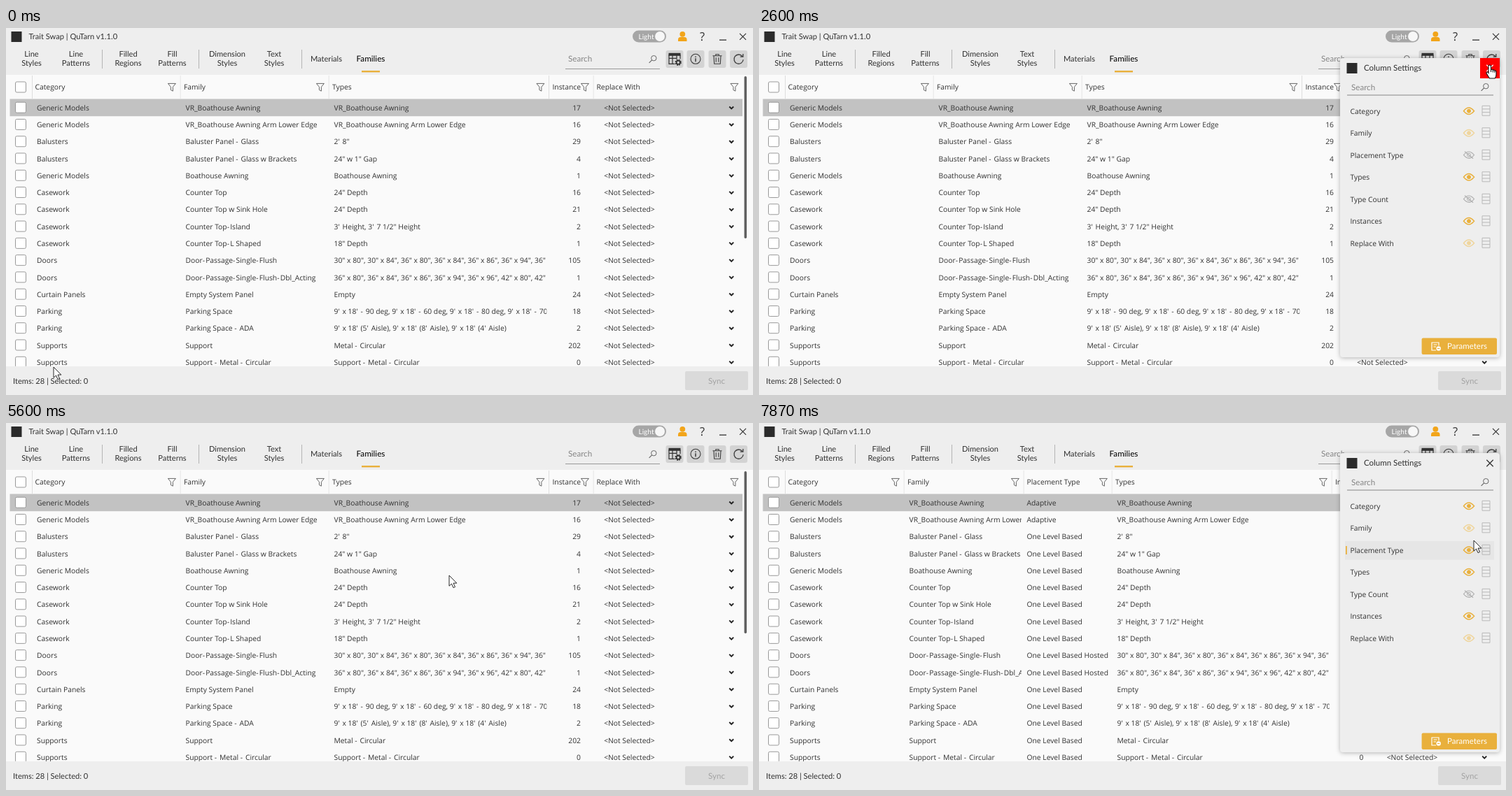
Write an HTML page that moves like this. It is 1067x525 px and loops after 8 s.

```html
<!DOCTYPE html>
<html lang="en">
<head>
<meta charset="utf-8">
<title>Column settings</title>
<style>
  html, body { margin: 0; width: 100%; height: 100%; overflow: hidden; background: #eee; }
  svg { display: block; }
  text { font: 10.3px "Open Sans", "Noto Sans", sans-serif; fill: #303030; text-rendering: geometricPrecision; white-space: pre; }
  .ui { font-family: Lato, "Open Sans", sans-serif; font-size: 11.1px; }
  .mark { letter-spacing: 1.2px; }
  .mid { text-anchor: middle; }
  .end { text-anchor: end; }
  .dim { fill: #9a9a9a; }
  .line { fill: none; stroke: #3c3c3c; stroke-width: 1.1; }
  .shadow { filter: drop-shadow(0 1px 3px rgba(0, 0, 0, .28)); }
</style>
</head>
<body>
<svg id="stage" width="1067" height="525" viewBox="0 0 1067 525"></svg>
<script>
const ORANGE = '#e9b03c';
const $ = id => document.getElementById(id);

// Drawing helpers
const rect = (x, y, w, h, fill, extra = '') =>
  `<rect x="${x}" y="${y}" width="${w}" height="${h}" fill="${fill}" ${extra}/>`;
const text = (x, y, s, cls = '', extra = '') =>
  `<text x="${x}" y="${y}" class="${cls}" ${extra}>${s.replace(/</g, '&lt;').replace(/['-]/g, '<tspan class="mark">$&</tspan>')}</text>`;
const path = (d, extra = '') => `<path class="line" d="${d}" ${extra}/>`;
const at = (x, y, body) => `<g transform="translate(${x} ${y})">${body}</g>`;
const group = (id, body) => `<g id="${id}">${body}</g>`;
const paint = (stroke, width = 1.1) => `style="stroke:${stroke};stroke-width:${width}"`;

// Icons, centred on 0,0
const FUNNEL = 'M-5.5-5.3H5.5L1.5-.4V5.5L-1.5 4V-.4Z';
const cross = (r, color, w = 1.1) => path(`M${-r} ${-r}L${r} ${r}M${r} ${-r}L${-r} ${r}`, paint(color, w));
const lens = color => `<circle cx="1.3" cy="-1.3" r="3.7" fill="none" stroke="${color}"/>` + path('M-1.4 1.4L-5.4 5.4', paint(color));
const tableGear = bg => rect(-8.5, -8.5, 17, 4, '#333') +
  path('M-8-6V7H1M-3-6V7M3-6V1M8-6V0M-8-1H3', paint('#333', 1.2)) +
  `<circle cx="5.2" cy="5" r="5.4" fill="${bg}"/>` +
  '<circle cx="5.2" cy="5" r="3.5" fill="none" stroke="#333" stroke-width="2.2" stroke-dasharray="1.8 .95"/>' +
  '<circle cx="5.2" cy="5" r="2.5" fill="none" stroke="#333" stroke-width="1.6"/>';
const info = '<circle r="7" class="line"/>' + path('M0-1V4M0-3.8V-2.3', paint('#333', 1.4));
const trash = path('M-6.5-4.5H6.5M-2.2-4.5V-6.5H2.2V-4.5M-5-4.5L-4.3 7H4.3L5-4.5M-1.8-2V4.5M1.8-2V4.5');
const refresh = path('M5.2-3.8A6.6 6.6 0 1 0 6.6 1M6.3-7.3V-3.2H2.2', paint('#3c3c3c', 1.3));
const eye = (color, off) => path('M-7.5 0Q0-9.4 7.5 0Q0 9.4-7.5 0Z', paint(color, off ? 1.1 : 1.5)) +
  `<circle r="2.5" fill="${off ? 'none' : color}" stroke="${color}"/>` + (off ? path('M-6-5L6 5', paint(color, 1.3)) : '');
const listIcon = path('M-5.5-7H5.5V7H-5.5ZM-5.5-2.4H5.5M-5.5 2.3H5.5', paint('#b9b9b9', 1));
const groupIcon = color => path('M-1-5.5H7V5.5H-1ZM-1-1.8H7M-1 1.8H7M3-5.5V5.5M-7-2.5H-3V2.5H-7ZM-3 0H-1', paint(color, 1));
const box = y => rect(13.5, y - 7.5, 15, 15, '#fff', 'rx="2" stroke="#999"');

// Table
const ROWS = `Generic Models|VR_Boathouse Awning|Adaptive|VR_Boathouse Awning|17
Generic Models|VR_Boathouse Awning Arm Lower Edge|Adaptive|VR_Boathouse Awning Arm Lower Edge|16
Balusters|Baluster Panel - Glass||2' 8"|29
Balusters|Baluster Panel - Glass w Brackets||24" w 1" Gap|4
Generic Models|Boathouse Awning||Boathouse Awning|1
Casework|Counter Top||24" Depth|16
Casework|Counter Top w Sink Hole||24" Depth|21
Casework|Counter Top-Island||3' Height, 3' 7 1/2" Height|2
Casework|Counter Top-L Shaped||18" Depth|1
Doors|Door-Passage-Single-Flush|One Level Based Hosted|30" x 80", 30" x 84", 36" x 80", 36" x 84", 36" x 86", 36" x 94", 36"|105
Doors|Door-Passage-Single-Flush-Dbl_Acting|One Level Based Hosted|36" x 80", 36" x 84", 36" x 86", 36" x 94", 36" x 96", 42" x 80", 42"|1
Curtain Panels|Empty System Panel||Empty|24
Parking|Parking Space||9' x 18' - 90 deg, 9' x 18' - 60 deg, 9' x 18' - 80 deg, 9' x 18' - 70|18
Parking|Parking Space - ADA||9' x 18' (5' Aisle), 9' x 18' (8' Aisle), 9' x 18' (4' Aisle)|2
Supports|Support||Metal - Circular|202
Supports|Support - Metal - Circular||Support - Metal - Circular|0`
  .split('\n').map(r => [...r.split('|'), '<Not Selected>']);
const rowY = i => 114 + 24.27 * i;

// name, header offset, cell offset
const COLS = [['Category', 4.5, 7], ['Family', 5.5, 8], ['Placement Type', 5, 5],
  ['Types', 5.5, 8], ['Instance', 5.5, 46], ['Replace With', 5, 15.7]];
const NARROW = [37, 248.5, 460.5, 460.5, 775, 838.5, 1052];
const WIDE = [37, 206.5, 377.5, 503.5, 817.5, 881, 1052];

function table(edges) {
  return COLS.map(([name, hx, cx], c) => {
    const x = edges[c], w = edges[c + 1] - x;
    if (!w) return '';
    const cells = ROWS.map((r, i) =>
      text(cx, rowY(i) + 3.8, r[c] || 'One Level Based', c === 4 ? 'end' : '') +
      (c === 5 ? at(w - 15.8, rowY(i), path('M-3-1.5L0 1.5L3-1.5', paint('#222', 1.9))) : '')).join('');
    return `<svg x="${x}" y="0" width="${w - 2.8}" height="525">` + rect(0, 68, 1, 33, '#dedede') +
      text(hx, 88.3, name) + cells + at(w - 11.6, 84.7, path(FUNNEL, paint('#666', 1))) + '</svg>';
  }).join('');
}

// Window frame
const TABS = [[36.5, 'Line', 'Styles'], [100, 'Line', 'Patterns'], [174.5, 'Filled', 'Regions'], [237.5, 'Fill', 'Patterns'],
  [316, 'Dimension', 'Styles'], [383, 'Text', 'Styles'], [457.5, 'Materials'], [521, 'Families']];
const tabs = TABS.map(([x, a, b]) => b
  ? text(x, 41.4, a, 'ui mid') + text(x, 53.6, b, 'ui mid')
  : text(x, 48, a, 'ui mid', a === 'Families' ? 'style="fill:#000;font-size:11.7px"' : '')).join('') +
  [137, 275, 422].map(x => rect(x, 31, 1, 27, '#b5b5b5')).join('') + rect(508, 61, 26, 2.4, ORANGE);

const tool = (x, icon, id) => rect(x - 12.5, 32, 25, 25, '#d3d3d3', `rx="3" id="${id}"`) + at(x, 44.3, icon);
const header = rect(7.5, 5, 15, 15, '#2b2b2b') + text(32.5, 16, 'Trait Swap | QuTarn v1.1.0', 'ui') +
  rect(895, 3.5, 48, 17, '#a6a6a6', 'rx="8.5"') + text(903.5, 16, 'Light', 'ui', 'style="fill:#fff;font-size:10.1px"') +
  '<circle cx="934" cy="12" r="7" fill="#f7f7f7"/>' +
  '<circle cx="966.3" cy="8.8" r="3.9" fill="#f2a51a"/><path d="M960 19V16.5Q960 13.4 963.5 13H969Q972.5 13.4 972.5 16.5V19Z" fill="#f2a51a"/>' +
  text(994.5, 18, '?', 'mid', 'style="font-size:16.5px"') + rect(1019, 16.5, 10, 1.3, '#333') +
  at(1052.5, 12.3, cross(4.5, '#333', 1.2)) + tabs +
  text(803, 48, 'Search', 'ui dim', 'style="font-size:11.6px;fill:#858585"') + rect(799, 58, 135, 1, '#999') + at(924, 44.5, lens('#666')) +
  tool(955, tableGear('#d3d3d3'), 'colBtn') + tool(985, info, 'infoBtn') + tool(1016, trash, 'trashBtn') + tool(1046.5, refresh, 'refreshBtn');

const footer = rect(0, 484, 1067, 41, '#eee') + text(10, 508.5, 'Items: 28 | Selected: 0', 'ui') +
  rect(970, 491, 90, 27, '#dadada', 'rx="2"') + text(1015, 508.6, 'Sync', 'ui mid', 'style="font-size:11.6px;fill:#a3a3a3"');

// Column settings panel
const FIELDS = [['Category', 1], ['Family', 2], ['Placement Type', 0], ['Types', 1], ['Type Count', 0], ['Instances', 1], ['Replace With', 2]];
const eyeKinds = [eye('#b0b0b0', true), eye(ORANGE), eye('#efd59c')];
const fields = FIELDS.map(([name, kind], i) => {
  const y = 118.7 + 31.5 * i;
  const icon = i === 2 ? group('eyeOff', eyeKinds[0]) + group('eyeOn', eyeKinds[1]) : eyeKinds[kind];
  return text(844.5, y + 3.9, name) + at(1014, y, icon) + at(1038.5, y - .4, listIcon);
}).join('');
const panel = rect(830, 43, 228, 428, '#eee', 'rx="4" class="shadow"') +
  rect(839.5, 50, 15, 15, '#2b2b2b') + text(864, 61.3, 'Column Settings', 'ui', 'style="font-size:11.5px"') +
  rect(1030, 43, 28, 29, '#f00', 'id="closeBg"') + `<g id="closeX" transform="translate(1044 57.5)">${cross(4.7, 'currentColor', 1.3)}</g>` +
  text(846, 88.5, 'Search', 'ui', 'style="font-size:11.6px;fill:#858585"') + rect(840, 95.5, 209, 1, '#888') + at(1037, 84.5, lens('#666')) +
  group('picked', rect(837, 169, 213, 26.5, '#e6e6e6') + rect(838, 176, 1.8, 12, ORANGE)) + fields +
  rect(946.6, 443.6, 107.4, 23.4, ORANGE, 'rx="2"') +
  at(967, 455.5, path('M4-1V-5.5H-6V5.5H0M-3.5-2.5H1.5M-3.5 .5H0', paint('#fff', 1.2)) +
    '<circle cx="3.7" cy="3" r="3.2" fill="#fff"/>' + path('M2 3H5.4', paint(ORANGE, 1.1))) +
  text(983, 459.3, 'Parameters', 'ui', 'style="font-size:11.5px;fill:#fff"');

// Context menu: y, label, icon
const RED = '#e06a6a';
const redX = at(4.8, .5, cross(3.2, RED, 1.3));
const sortIcon = text(-9, -1.5, 'Z', 'dim', 'style="font-size:9px"') + text(-9, 8, 'A', 'dim', 'style="font-size:9px"') + redX;
const arrows = d => path(d, paint('#777', 1));
const ITEMS = [
  [104.3, 'Clear Sorting', sortIcon], [131.5, 'Clear Filtering', at(-4, 0, path(FUNNEL, paint('#999', 1))) + redX],
  [163.3, 'Hide Column', ''], [188.5, 'Show All Columns', ''], [213.5, 'Column Settings', tableGear('#fafafa')],
  [243, 'Stretch to Fill', arrows('M-9-3.5V3.5M9-3.5V3.5M-2 0H-8M-5.5-2.5L-8 0L-5.5 2.5M2 0H8M5.5-2.5L8 0L5.5 2.5')],
  [268.3, 'Auto Fit', arrows('M-9-3.5V3.5M9-3.5V3.5M-1.5-3.5V3.5M1.5-3.5V3.5M-8 0H-3M-5-2L-3 0L-5 2M8 0H3M5-2L3 0L5 2')],
  [298, 'Group by this Column', groupIcon('#555')], [323, 'Clear Groups', groupIcon('#999') + at(-5, 0, cross(2.5, RED, 1.2))]];
const isDim = s => /Sorting|Filtering|Groups/.test(s);
const menu = rect(547.5, 89.5, 169.5, 247.5, '#fafafa', 'rx="6" class="shadow"') +
  rect(553.5, 0, 157.5, 21.5, '#efefef', 'rx="3" id="menuHot"') +
  [147.5, 228.2, 283].map(y => rect(553, y, 158, 1, '#e0e0e0')).join('') +
  ITEMS.map(([y, s, icon]) => at(566, y, icon) + text(585, y + 3.8, s, isDim(s) ? 'dim' : '')).join('');

const arrow = '<path d="M0 0V15.2L3.5 12L6 17.6L8.5 16.5L6 11.1H10.8Z" fill="#fff" stroke="#111" stroke-width=".9"/>';
const hand = '<path d="M-2 1.6Q-2 0-.3 0T1.5 1.6V6.5Q4 5.8 4.3 7.2Q6.3 6.6 6.8 8.1Q9 7.6 9 9.8V14Q9 17 7 19H-.5Q-3.5 14.5-5 11.5Q-5.2 9.6-3.2 10L-2 11.4ZM1.5 6.5V10M4.3 7.2V10.4M6.8 8.1V10.8" fill="#fff" stroke="#111" stroke-width="1.1"/>';

$('stage').innerHTML = rect(0, 0, 1067, 525, '#eee') + rect(0, 67, 1067, 417, '#fafafa') +
  rect(0, 68, 0, 33, '#ededed', 'id="headHot"') + rect(5.5, 101.5, 1046.5, 24.7, '#c2c2c2') +
  group('narrow', table(NARROW)) + group('wide', table(WIDE)) +
  group('funnelHot', path(FUNNEL, paint('#222', 1.2))) +
  box(84.5) + ROWS.map((_, i) => box(rowY(i) - .3)).join('') +
  rect(1054.5, 69, 3.5, 232, '#606060', 'rx="1.7"') + header + footer +
  group('panel', panel) + group('menu', menu) + group('cursor', group('arrow', arrow) + group('hand', hand));

// Pointer path: time, x, y
const PATH = [
  [0, 68, 485], [130, 150, 440], [270, 520, 255], [400, 905, 70], [470, 950, 45], [1400, 950, 45],
  [1530, 928, 95], [1670, 918, 180], [1800, 940, 280], [1930, 990, 308], [2070, 1020, 250], [2200, 1032, 125],
  [2270, 1037, 68], [2400, 1041, 58], [2600, 1044, 53], [3270, 1044, 53],
  [3470, 1000, 75], [3730, 830, 96], [4000, 732, 90], [4130, 732, 90],
  [4270, 717, 89], [4400, 705, 105], [4730, 648, 171], [5000, 643, 226], [5330, 633, 218], [5600, 633, 218],
  [5730, 730, 165], [5930, 948, 111], [6130, 946, 165], [6400, 922, 245], [6530, 935, 254],
  [6730, 990, 215], [6930, 1021, 171], [7000, 1021, 171], [7130, 1012, 180], [7600, 1012, 180],
  [7670, 1006, 198], [7730, 1005, 211], [7800, 1014, 188], [7870, 1021, 168], [8000, 1021, 168]];

function pointer(t) {
  const i = PATH.findIndex(p => p[0] > t);
  const [t0, x0, y0] = PATH[i - 1], [t1, x1, y1] = PATH[i];
  const k = (t - t0) / (t1 - t0);
  return [x0 + (x1 - x0) * k, y0 + (y1 - y0) * k];
}

const show = (id, on) => $(id).setAttribute('display', on ? 'inline' : 'none');
const set = (id, attrs) => { for (const k in attrs) $(id).setAttribute(k, attrs[k]); };

function draw(ms) {
  // Motion steps 15 times a second, rounded to 10 ms.
  const t = Math.round(Math.floor((ms + 5) * .015) * 20 / 3) * 10 % 8000;
  const within = (a, b) => t >= a && t < b;
  const [x, y] = pointer(t);

  const panelOn = within(1270, 3330) || t >= 5670;
  const menuOn = within(4330, 5600);
  const handOn = within(470, 1470) || within(2330, 3400);
  show('panel', panelOn);
  show('menu', menuOn);
  show('hand', handOn);
  show('arrow', !handOn);
  set('cursor', { transform: `translate(${x.toFixed(1)} ${y.toFixed(1)})` });

  const pressed = within(1070, 1200);
  set('colBtn', { fill: pressed ? '#a2a2a2' : within(670, 1470) ? '#b6b6b6' : '#d3d3d3' });

  const closeHot = within(2330, 3330);
  show('closeBg', closeHot);
  set('closeBg', { fill: t >= 3130 ? '#d60000' : '#f00' });
  set('closeX', { color: closeHot ? '#fff' : '#333' });

  const col = within(3400, 4330) && y > 68 && y < 101 ? NARROW.findIndex((e, i) => e <= x && x < NARROW[i + 1]) : -1;
  show('headHot', col >= 0);
  show('funnelHot', col >= 0);
  if (col >= 0) {
    set('headHot', { x: NARROW[col], width: NARROW[col + 1] - NARROW[col] });
    set('funnelHot', { transform: `translate(${NARROW[col + 1] - 11.6} 84.7)` });
  }

  const item = ITEMS.find(([iy, s]) => Math.abs(iy - y) < 12.8 && !isDim(s));
  show('menuHot', menuOn && item);
  if (item) set('menuHot', { y: item[0] - 10.8 });

  const picked = t >= 7270, wide = t >= 7330;
  show('picked', picked);
  show('eyeOn', picked);
  show('eyeOff', !picked);
  show('wide', wide);
  show('narrow', !wide);
}

function tick() {
  draw(performance.now() % 8000);
  requestAnimationFrame(tick);
}
tick();
</script>
</body>
</html>
```
